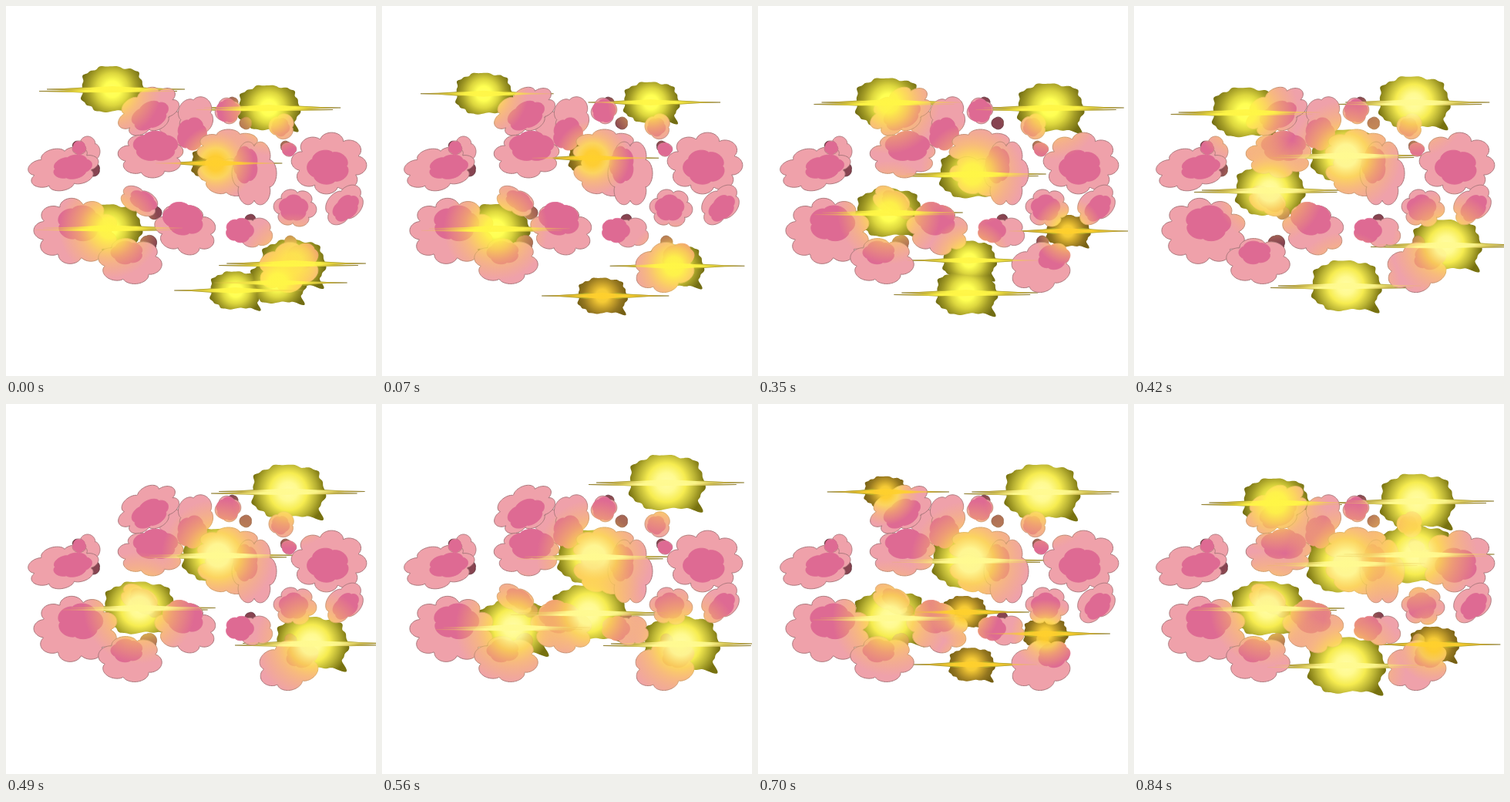
An HTML page with a canvas for the animation above (0.91 s loop, 480 by 480 pixels).

```html
<!DOCTYPE html>
<html lang="en">
<head>
<meta charset="utf-8">
<title>Glittering blossoms</title>
<style>
html, body { margin: 0; width: 100%; height: 100%; overflow: hidden; background: #fff; }
canvas { display: block; width: 480px; height: 480px; }
</style>
</head>
<body>
<canvas id="stage" width="480" height="480"></canvas>
<script>
const SIZE = 480, STEP = 70, COUNT = 13, TAU = 2 * Math.PI;
const LIGHT = '#efa1aa', ROSE = '#de6a93', PLUM = '#874451', RIM = '#a9777b';

const layer = () => {
  const canvas = document.createElement('canvas');
  canvas.width = canvas.height = SIZE;
  return canvas.getContext('2d');
};
const stage = document.getElementById('stage').getContext('2d');
const flowers = layer(), glows = layer(), lit = layer();

// Closed curve through point(angle) around a centre.
function ring(x, y, point) {
  const path = new Path2D();
  for (let a = 0; a < TAU; a += TAU / 180) {
    const [dx, dy] = point(a);
    path.lineTo(x + dx, y + dy);
  }
  path.closePath();
  return path;
}

// ---- blossoms ----
// An ellipse scalloped into n petals, then tilted.
function scallop(color, x, y, rx, ry, n, tilt, depth, rim) {
  const c = Math.cos(tilt), s = Math.sin(tilt);
  const path = ring(x, y, a => {
    const k = 1 - depth + depth * Math.abs(Math.sin(n * a / 2 + x)) ** .6;
    const u = rx * k * Math.cos(a), v = ry * k * Math.sin(a);
    return [u * c - v * s, u * s + v * c];
  });
  flowers.fillStyle = color;
  flowers.fill(path);
  flowers.strokeStyle = rim;
  flowers.stroke(path);
}
const petals = (x, y, rx, ry, n, tilt = 0) => scallop(LIGHT, x, y, rx, ry, n, tilt, .22, RIM);
const bud = (x, y, r = 7) => scallop(PLUM, x, y, r, r, 3, 0, .1, '#5b2d36');

function bloom(x, y, rx, ry, n, tilt, heartX, heartY, scale) {
  petals(x, y, rx, ry, n, tilt);
  scallop(ROSE, heartX, heartY, rx * scale, ry * scale, 5, tilt, .14, ROSE);
}

bud(294, 125);
bud(311, 152, 8);
bud(363, 182);
bud(93, 182);
bud(113, 212, 9);
bud(193, 268, 9);
bud(185, 308, 11);
bud(317, 277);
bud(369, 306, 8);
petals(222, 160, 25, 23, 5);
bloom(185, 136, 43, 28, 7, -.5, 187, 142, .6);
bloom(246, 143, 24, 27, 4, .3, 241, 166, .8);
bloom(188, 194, 43, 29, 7, 0, 194, 182, .68);
petals(290, 185, 43, 25, 7);
petals(285, 221, 37, 25, 6, .3);
bloom(322, 217, 29, 44, 6, 0, 311, 206, .55);
bloom(288, 136, 17, 17, 4, 0, 288, 136, .9);
bloom(358, 156, 17, 17, 3, 0, 356, 157, .7);
bloom(367, 186, 10, 9, 3, .3, 367, 186, .95);
petals(105, 188, 17, 19, 4);
bloom(74, 211, 47, 28, 7, -.2, 86, 209, .55);
bloom(95, 184, 9, 9, 3, 0, 95, 184, .95);
bloom(419, 204, 49, 40, 8, 0, 418, 209, .56);
bloom(439, 258, 30, 21, 4, -.8, 441, 262, .66);
bloom(375, 262, 28, 25, 6, 0, 373, 262, .68);
bloom(91, 292, 55, 43, 9, 0, 96, 282, .54);
bloom(161, 331, 42, 30, 6, 0, 157, 320, .5);
bloom(173, 253, 27, 17, 4, .5, 178, 253, .7);
bloom(233, 290, 41, 32, 7, .3, 230, 276, .66);
bloom(324, 294, 23, 20, 4, 0, 303, 291, .8);
bloom(367, 339, 41, 32, 6, -.3, 384, 325, .52);

// ---- sparkles: a few key poses [step, x, y, radius], blended in between ----
const steps = Array.from({ length: COUNT }, () => []);

function spark(...keys) {
  keys.forEach((from, i) => {
    const to = keys[i + 1];
    const end = to ? to[0] : from[0] + 1;
    for (let n = from[0]; n < end; n++) {
      const k = to ? (n - from[0]) / (end - from[0]) : 0;
      steps[n].push([1, 2, 3].map(j => to ? from[j] + (to[j] - from[j]) * k : from[j]));
    }
  });
}
spark([0, 138, 108, 40], [3, 120, 125, 28], [5, 169, 125, 42], [6, 145, 138, 43]);
spark([10, 165, 114, 27], [12, 184, 128, 42]);
spark([0, 341, 132, 39], [3, 365, 111, 28], [5, 379, 132, 42], [6, 363, 125, 45], [8, 369, 102, 48], [12, 367, 126, 47]);
spark([0, 272, 204, 31], [3, 275, 184, 30], [5, 278, 218, 42], [6, 275, 194, 45], [12, 275, 207, 50]);
spark([0, 134, 288, 41], [3, 175, 290, 45], [5, 170, 268, 42], [6, 176, 239, 44], [8, 170, 290, 47], [12, 173, 265, 47]);
spark([0, 372, 334, 41], [3, 392, 344, 30], [5, 402, 292, 28], [6, 405, 310, 44], [8, 388, 311, 48], [10, 373, 298, 28], [12, 389, 312, 31]);
spark([0, 298, 369, 33], [3, 261, 390, 28], [6, 275, 363, 44]);
spark([10, 277, 338, 29], [12, 275, 339, 49]);
spark([0, 352, 359, 36]);
spark([5, 274, 330, 34]);
spark([8, 268, 271, 48], [10, 268, 270, 28]);
spark([12, 365, 195, 50]);

// Small sparkles are amber, then yellow, and the largest nearly white.
const AMBER = { rgb: '255,208,45', fill: ['#fad033', '#f5ca35', '#c59f2a', '#957720', '#766014'] };
const YELLOW = { rgb: '255,246,70', fill: ['#ffff62', '#ffff52', '#dcd63e', '#a39c26', '#726d13'] };
const PALE = { rgb: '255,250,145', fill: ['#fffca6', '#fffa90', '#f6ec50', '#b9b233', '#77710f'] };
const tone = r => r < 32 ? AMBER : r < 44 ? YELLOW : PALE;

// A boxy puff with a ragged edge and one tail at lower right.
const puff = (x, y, r) => ring(x, y, a => {
  const round = v => Math.sign(v) * Math.abs(v) ** .75;
  const tail = .3 * Math.exp(-(((a - .85) / .16) ** 2));
  const k = r * (1 + tail + .04 * Math.sin(7 * a + 1) + .025 * Math.sin(16 * a));
  return [k * round(Math.cos(a)), .73 * k * round(Math.sin(a))];
});

function radial(g, x, y, r, colors) {
  const fill = g.createRadialGradient(x, y, 0, x, y, r);
  colors.forEach((color, i) => fill.addColorStop(i / (colors.length - 1), color));
  return fill;
}

// Lens streak, thick at the middle and one pixel high at the tips.
function streak(g, x, y, r, thick, tip, middle) {
  const left = x - 55 - .75 * r, right = x + 60 + .85 * r;
  const fill = g.createLinearGradient(left, 0, right, 0);
  [tip, middle, middle, tip].forEach((color, i) => fill.addColorStop(i / 3, color));
  g.fillStyle = fill;
  g.beginPath();
  for (const side of [-1, 1]) {
    g.moveTo(left, y);
    g.lineTo(left, y + side * .5);
    g.quadraticCurveTo(x - r, y + side, x, y + side * thick);
    g.quadraticCurveTo(x + r, y + side, right, y + side * .5);
    g.lineTo(right, y);
  }
  g.fill();
}

function twinStreak(g, x, y, r, thick, tip, middle) {
  streak(g, x, y, r, thick, tip, middle);
  if (r >= 38) streak(g, x - 10, y + 2.5, r, thick / 2, tip, middle);
}

function drawGlow([x, y, r]) {
  const { rgb, fill } = tone(r);
  glows.fillStyle = radial(glows, x, y, r * 1.05, fill);
  glows.fill(puff(x, y, r));
  twinStreak(glows, x, y, r, 7, '#766d2c', '#b5aa28');

  const reach = 1.6 * r;
  lit.fillStyle = radial(lit, x, y, reach, [
    `rgba(${rgb},1)`, `rgba(${rgb},.95)`, 'rgba(255,226,75,.78)',
    'rgba(255,208,85,.5)', 'rgba(250,195,95,.28)', 'rgba(250,190,95,0)']);
  lit.fillRect(x - reach, y - reach, 2 * reach, 2 * reach);
}

function drawShine([x, y, r]) {
  twinStreak(stage, x, y, r, 4, '#e5b64a33', `rgba(${tone(r).rgb},.9)`);
}

function render(step) {
  const sparks = steps[step];
  glows.clearRect(0, 0, SIZE, SIZE);
  glows.globalCompositeOperation = 'lighten';
  lit.globalCompositeOperation = 'copy';
  lit.drawImage(flowers.canvas, 0, 0);
  lit.globalCompositeOperation = 'source-atop';
  sparks.forEach(drawGlow);
  stage.fillStyle = '#fff';
  stage.fillRect(0, 0, SIZE, SIZE);
  stage.drawImage(glows.canvas, 0, 0);
  stage.drawImage(lit.canvas, 0, 0);
  sparks.forEach(drawShine);
}

let start, shown = 0;
function tick(now) {
  start ??= now;
  const step = Math.floor((now - start) / STEP) % COUNT;
  if (step !== shown) render(shown = step);
  requestAnimationFrame(tick);
}
render(0);
requestAnimationFrame(tick);
</script>
</body>
</html>
```
